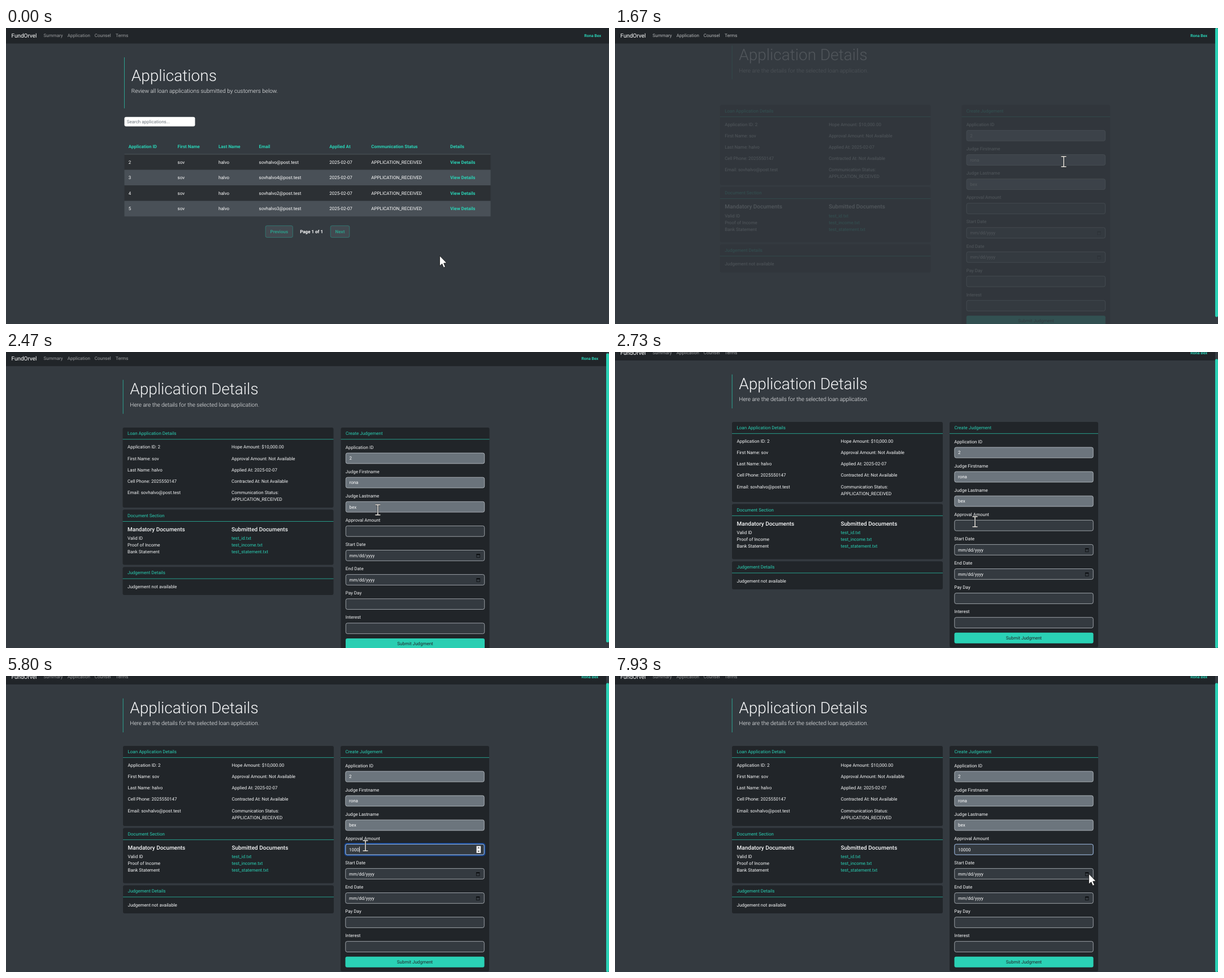
Recreate the animation shown at these times as an HTML page with a canvas. Size 1067 by 525 pixels, loop 8 s.

```html
<!DOCTYPE html>
<html lang="en">
<head>
<meta charset="utf-8">
<title>Loan applications</title>
<style>
html, body { margin: 0; width: 100%; height: 100%; overflow: hidden; background: #343a40; }
canvas { display: block; width: 1067px; height: 525px; }
</style>
</head>
<body>
<canvas id="stage"></canvas>
<script>
const W = 1067, H = 525, LOOP = 8000;
const BG = '#343a40', DARK = '#212529', TEAL = '#2ad1b5', WHITE = '#f8f9fa';
const BRAND = 'FundOrvel', FIRST = 'sov', LAST = 'halvo', JUDGE = ['rona', 'bex'];
const mail = n => `${FIRST}${LAST}${n}@post.test`;
const OPEN_PAGE = 1330, ENTER = 1580, FOCUS = 3200, BLUR = 7900;
const KEYS = [4930, 5130, 5330, 5800, 6000];
const AMOUNT = '10000';

// time, x, y, shape used until the next point
const PATH = [
  [400, 767, 403.5, 'arrow'], [700, 802, 305, 'arrow'], [880, 822, 236, 'arrow'],
  [980, 812, 217, 'arrow'], [1060, 800, 230, 'hand'], [1130, 794, 237, 'hand'],
  [OPEN_PAGE, 794, 237, 'arrow'], [ENTER, 794, 237, 'beam'], [1740, 794, 237, 'beam'],
  [1900, 745, 249, 'arrow'], [2130, 672, 266, 'arrow'], [2330, 662, 276, 'beam'],
  [2470, 658, 280, 'beam'], [2730, 637, 301, 'beam'], [3000, 637, 301, 'beam'],
  [3200, 635, 301, 'beam'], [3729, 635, 301, 'beam'], [3730, 635.5, 301, 'beam'],
  [3999, 635.5, 301, 'beam'], [4000, 636, 301, 'beam'], [6960, 636, 301, 'beam'],
  [7000, 640, 301, 'beam'], [7130, 700, 335, 'arrow'], [7270, 815, 425, 'arrow'],
  [7370, 888, 477, 'arrow'], [7480, 878, 425, 'arrow'], [7670, 838, 350.5, 'arrow']
];

const canvas = document.getElementById('stage');
const layer = document.createElement('canvas');
const dpr = window.devicePixelRatio || 1;
for (const c of [canvas, layer]) {
  c.width = Math.round(W * dpr);
  c.height = Math.round(H * dpr);
}
const main = canvas.getContext('2d'), over = layer.getContext('2d');
let g = main;

const clamp = (v, a = 0, b = 1) => Math.min(b, Math.max(a, v));
const smooth = p => p * p * (3 - 2 * p);

// cubic-bezier(0, 0, .58, 1)
function easeOut(p) {
  if (p <= 0 || p >= 1) return clamp(p);
  let lo = 0, hi = 1, s = .5;
  for (let i = 0; i < 24; i++) {
    s = (lo + hi) / 2;
    if (3 * (1 - s) * s * s * .58 + s * s * s < p) lo = s; else hi = s;
  }
  return 3 * (1 - s) * s * s + s * s * s;
}

function rect(x, y, w, h, color) {
  g.fillStyle = color;
  g.fillRect(x, y, w, h);
}

function box(x, y, w, h, r, fill, stroke, line = .7) {
  g.beginPath();
  g.roundRect(x, y, w, h, r);
  if (fill) { g.fillStyle = fill; g.fill(); }
  if (stroke) { g.strokeStyle = stroke; g.lineWidth = line; g.stroke(); }
}

// y is the middle of the capitals
function text(str, x, y, color = WHITE, size = 8, weight = 400, align = 'left') {
  g.font = `${weight} ${size}px Roboto, sans-serif`;
  g.textRendering = 'geometricPrecision';
  g.textAlign = align;
  g.fillStyle = color;
  g.fillText(str, x, y + size * .355);
}

function navbar(right, links) {
  rect(0, 0, W, 27.5, DARK);
  text(BRAND, 9.5, 13.7, '#fff', 10);
  [['Summary', 66.5], ['Application', 108.8], ['Counsel', 156.7], ['Terms', 194]]
    .forEach(([s, x]) => text(s, x, 13.5, links));
  text('Rona Bex', right, 13.7, TEAL, 7, 700, 'right');
}

function header(x, y, h, title, lead) {
  rect(x, y, .7, h, TEAL);
  text(title, x + 12.4, y + (h > 80 ? 31.8 : 16), WHITE, 28, 300);
  text(lead, x + 12.5, y + (h > 80 ? 59.5 : 44), WHITE, 10, 300);
}

function listPage() {
  navbar(1053, '#9b9d9f');
  header(209.3, 52, 90.5, 'Applications', 'Review all loan applications submitted by customers below.');
  box(209.5, 157.7, 125, 16.7, 3, '#fff');
  text('Search applications...', 213.7, 166, '#6c757d');

  const cols = [216.8, 303.5, 376, 447.5, 572.3, 646.3, 786];
  ['Application ID', 'First Name', 'Last Name', 'Email', 'Applied At', 'Communication Status', 'Details']
    .forEach((s, i) => text(s, cols[i], 210, TEAL, 8, 700));
  ['', '4', '2', '3'].forEach((n, i) => {
    const y = 224 + i * 27.55, mid = y + 13.8;
    rect(209.5, y, 648, 27.55, i % 2 ? '#495057' : '#2c3034');
    [i + 2, FIRST, LAST, mail(n), '2025-02-07', 'APPLICATION_RECEIVED']
      .forEach((s, c) => text(s, cols[c], mid, '#fff'));
    text('View Details', cols[6], mid, TEAL, 8, 700);
  });
  rect(209.5, 223.6, 648, .7, '#5a6168');

  [['Previous', 459.2, 48.2], ['Next', 574.2, 33.6]].forEach(([s, x, w]) => {
    box(x, 350.7, w, 20.7, 2.5, '#424950', '#2f8c80');
    text(s, x + w / 2, 361, '#2d9c89', 8, 700, 'center');
  });
  text('Page 1 of 1', 520.2, 361, '#fff', 8, 700);
}

function card(x, y, w, h, title) {
  box(x, y, w, h, 3, DARK);
  text(title, x + 8.5, y + 10.3, TEAL);
  rect(x, y + 20.4, w, .7, TEAL);
}

function leftCards() {
  const a = 215.5, b = 399.5;
  card(207, 136.5, 373, 142, 'Loan Application Details');
  [
    ['Application ID: 2', 'Hope Amount: $10,000.00'],
    ['First Name: ' + FIRST, 'Approval Amount: Not Available'],
    ['Last Name: ' + LAST, 'Applied At: 2025-02-07'],
    ['Cell Phone: 2025550147', 'Contracted At: Not Available'],
    ['Email: ' + mail(''), 'Communication Status:']
  ].forEach(([l, r], i) => {
    text(l, a, 171 + i * 20.05);
    text(r, b, 171 + i * 20.05);
  });
  text('APPLICATION_RECEIVED', b, 263.3);

  card(207, 282, 373, 98, 'Document Section');
  text('Mandatory Documents', a, 316.5, WHITE, 10, 500);
  text('Submitted Documents', b, 316.5, WHITE, 10, 500);
  [['Valid ID', 'test_id.txt'], ['Proof of Income', 'test_income.txt'], ['Bank Statement', 'test_statement.txt']]
    .forEach(([l, r], i) => {
      text(l, a, 332.8 + i * 12);
      text(r, b, 332.8 + i * 12, TEAL);
    });

  card(207, 383.7, 373, 49.7, 'Judgement Details');
  text('Judgement not available', a, 418.3);
}

function calendar(x, y) {
  g.strokeStyle = '#0b0d0f';
  g.lineWidth = .8;
  g.strokeRect(x, y - 2.6, 5.6, 5.8);
  rect(x, y - 3, 5.6, 1.9, '#0b0d0f');
}

function spinner(x, y) {
  rect(x, y - 6.2, 7.6, 12.4, '#f1f1f1');
  g.fillStyle = '#444';
  for (const d of [-1, 1]) {
    g.beginPath();
    g.moveTo(x + 2, y + d * 2.3);
    g.lineTo(x + 5.6, y + d * 2.3);
    g.lineTo(x + 3.8, y + d * 4.5);
    g.fill();
  }
}

function amountField(t, y) {
  const glow = clamp((t - FOCUS) / 150) * (1 - clamp((t - BLUR) / 100));
  const typed = KEYS.filter(k => k <= t);
  if (glow > 0) {
    g.globalAlpha = glow;
    if (t < BLUR) box(599.5, y - 10.7, 248, 21.4, 4, null, 'rgba(13,80,190,.65)', 2);
    box(600.8, y - 9.4, 245.4, 18.8, 3, null, '#86b7fe', .8);
    g.globalAlpha = 1;
  }
  text(AMOUNT.slice(0, typed.length), 607, y, '#fff');
  if (t < FOCUS || t >= BLUR) return;
  spinner(832.5, y);
  const since = t - (typed.length ? typed[typed.length - 1] : FOCUS);
  if (Math.floor(since / 530) % 2 === 0) rect(607 + typed.length * 4.49, y - 5, .8, 10, '#fff');
}

function form(t) {
  card(592, 136.5, 263, 400, 'Create Judgement');
  const values = ['2', ...JUDGE, '', 'mm/dd/yyyy', 'mm/dd/yyyy', '', ''];
  ['Application ID', 'Judge Firstname', 'Judge Lastname', 'Approval Amount', 'Start Date', 'End Date', 'Pay Day', 'Interest']
    .forEach((label, i) => {
      const y = 190.9 + i * 43.1;
      text(label, 600.3, y - 19.7);
      box(600.8, y - 9.4, 245.4, 18.8, 3, i < 3 ? '#6c757d' : BG, '#ced4da');
      text(values[i], 607, y, '#fff');
      if (i === 3) amountField(t, y);
      if (i === 4 || i === 5) calendar(832.3, y + .3);
    });
  box(600.5, 510.3, 246, 19, 3, TEAL);
  text('Submit Judgment', 723.5, 519.5, DARK, 8, 400, 'center');
}

function fadeIn(p, dx, dy, scroll, draw) {
  if (p <= 0) return;
  over.setTransform(dpr, 0, 0, dpr, 0, 0);
  over.clearRect(0, 0, W, H);
  over.translate(dx * (1 - p), dy * (1 - p) - scroll);
  g = over;
  draw();
  g = main;
  g.globalAlpha = p;
  g.drawImage(layer, 0, 0, W, H);
  g.globalAlpha = 1;
}

function detailPage(t) {
  const scroll = 12.5 * smooth(clamp((t - 2390) / 290));
  const p = easeOut((t - ENTER) / 1000);
  g.save();
  g.translate(0, -scroll);
  navbar(1048, t < 1900 ? '#b4b6b8' : '#9b9d9f');
  g.restore();
  fadeIn(p, 0, -25, scroll, () => header(206.8, 52.3, 60.2, 'Application Details',
    'Here are the details for the selected loan application.'));
  fadeIn(p, -25, 0, scroll, leftCards);
  fadeIn(p, 25, 0, scroll, () => form(t));
  rect(1062, 0, 5, H, BG);
  box(1062, scroll, 5, 512.5, 2, TEAL);
}

function polygon(points) {
  g.beginPath();
  points.forEach(([x, y]) => g.lineTo(x, y));
  g.closePath();
}

const shapes = {
  arrow() {
    polygon([[.4, .4], [.4, 18.6], [4.6, 14.8], [7.4, 21.4], [10.4, 20.1], [7.6, 13.7], [12.9, 13.3]]);
    g.fillStyle = '#fff';
    g.fill();
    g.strokeStyle = '#111';
    g.lineWidth = .8;
    g.stroke();
  },
  beam() {
    const line = () => {
      g.beginPath();
      g.moveTo(-4.5, -9); g.lineTo(4.5, -9);
      g.moveTo(0, -9); g.lineTo(0, 9);
      g.moveTo(-4.5, 9); g.lineTo(4.5, 9);
      g.stroke();
    };
    g.strokeStyle = '#22262a';
    g.lineWidth = 2.8;
    line();
    g.strokeStyle = '#eeeae4';
    g.lineWidth = 1.5;
    line();
  },
  hand() {
    g.beginPath();
    g.roundRect(-1.6, 0, 3.6, 13, 1.8);
    g.roundRect(-1.6, 7, 12.2, 13, 3);
    g.moveTo(-1.6, 16); g.lineTo(-6, 10.5); g.lineTo(-4.2, 9.4); g.lineTo(-1.6, 11.5);
    g.closePath();
    g.strokeStyle = '#111';
    g.lineWidth = 1.4;
    g.stroke();
    g.fillStyle = '#fff';
    g.fill();
  }
};

function cursor(t) {
  let i = 0;
  while (i < PATH.length - 1 && PATH[i + 1][0] <= t) i++;
  const a = PATH[i], b = PATH[Math.min(i + 1, PATH.length - 1)];
  const p = b === a ? 0 : clamp((t - a[0]) / (b[0] - a[0]));
  g.save();
  g.translate(a[1] + (b[1] - a[1]) * p, a[2] + (b[2] - a[2]) * p);
  shapes[a[3]]();
  g.restore();
}

const start = performance.now();
function frame() {
  const t = (performance.now() - start) % LOOP;
  g.setTransform(dpr, 0, 0, dpr, 0, 0);
  rect(0, 0, W, H, BG);
  if (t < OPEN_PAGE) listPage(); else detailPage(t);
  cursor(t);
  requestAnimationFrame(frame);
}
frame();
</script>
</body>
</html>
```
